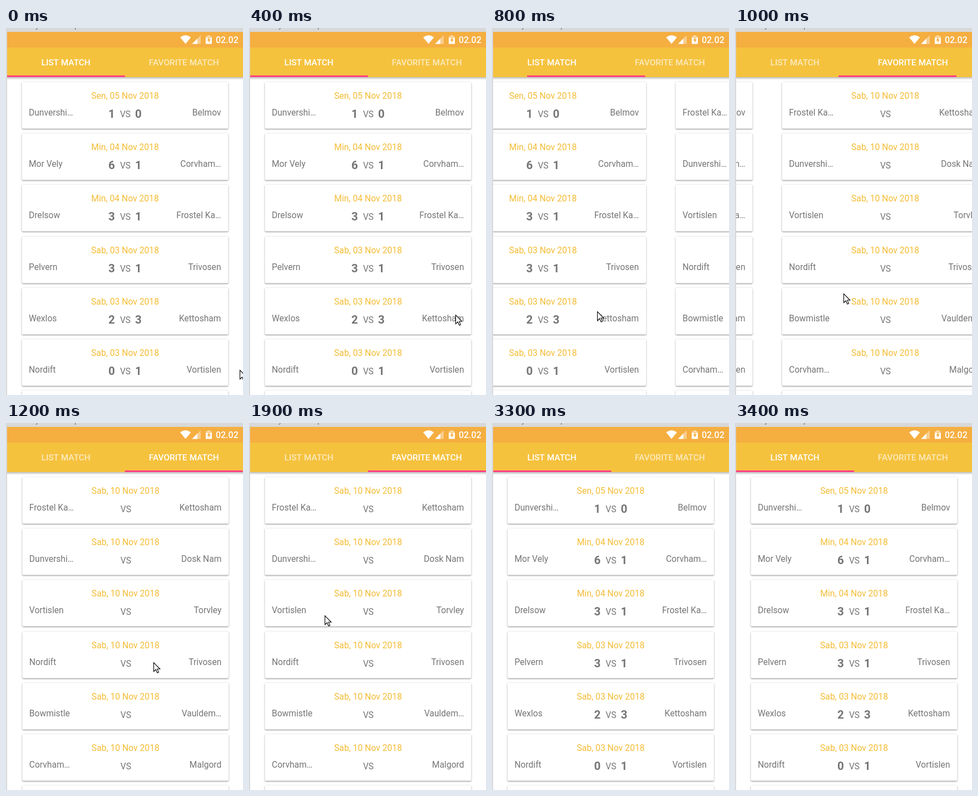
These frames come from a looping animation (426 px wide and 658 px high, 4 s). An HTML page with a canvas:

```html
<!DOCTYPE html>
<html lang="id">
<head>
<meta charset="utf-8">
<title>Match list</title>
<style>
html, body { margin: 0; width: 100%; height: 100%; overflow: hidden; background: #fff; }
canvas { display: block; }
</style>
</head>
<body>
<canvas width="426" height="658"></canvas>
<script>
const W = 426, H = 658, LEFT = 2, PAGE = 424, PITCH = 92.2;
const LOOP = 4000, STEP = 100;
const ctx = document.querySelector('canvas').getContext('2d');

// date | home | away | score
const played = [
  'Sen, 05 Nov 2018|Dunvershi…|Belmov|10',
  'Min, 04 Nov 2018|Mor Vely|Corvham…|61',
  'Min, 04 Nov 2018|Drelsow|Frostel Ka…|31',
  'Sab, 03 Nov 2018|Pelvern|Trivosen|31',
  'Sab, 03 Nov 2018|Wexlos|Kettosham|23',
  'Sab, 03 Nov 2018|Nordift|Vortislen|01'
];
const upcoming = [
  'Frostel Ka…|Kettosham', 'Dunvershi…|Dosk Nam', 'Vortislen|Torvley',
  'Nordift|Trivosen', 'Bowmistle|Vauldem…', 'Corvham…|Malgord'
].map(teams => 'Sab, 10 Nov 2018|' + teams);

// [time, value...] keys
const scrollKeys = [
  [600, 0], [700, 28], [800, 122.5], [900, 265], [1000, 368], [1100, 413],
  [1200, 423.2], [1300, 424], [2300, 424], [2400, 412.5], [3200, 412.5],
  [3300, 0.6], [3400, 0]
];
const cursorKeys = [
  [0, 420, 613], [400, 371, 514], [600, 330, 510], [800, 189, 508],
  [900, 160, 500], [1200, 265, 429], [1800, 131, 362], [1900, 136, 345],
  [2100, 149, 323], [2200, 149, 323], [2400, 245, 310]
];

function at(keys, t) {
  const i = keys.findIndex(k => k[0] > t);
  if (i === 0) return keys[0].slice(1);
  if (i < 0) return keys[keys.length - 1].slice(1);
  const a = keys[i - 1], b = keys[i], p = (t - a[0]) / (b[0] - a[0]);
  return a.slice(1).map((v, n) => v + (b[n + 1] - v) * p);
}

function rect(x, y, w, h, color) {
  ctx.fillStyle = color;
  ctx.fillRect(x, y, w, h);
}

function shape(path, color) {
  ctx.fillStyle = color;
  ctx.fill(new Path2D(path));
}

function text(str, x, y, size, color, align = 'center', weight = 400) {
  ctx.font = `${weight} ${size}px Roboto, sans-serif`;
  ctx.textAlign = align;
  ctx.fillStyle = color;
  ctx.fillText(str, x, y);
}

function card(x, y, row) {
  ctx.save();
  ctx.shadowColor = 'rgba(0,0,0,.42)';
  ctx.shadowBlur = 2.5;
  ctx.shadowOffsetY = 1.3;
  ctx.fillStyle = '#fff';
  ctx.beginPath();
  ctx.roundRect(x + 28.5, y + .5, 371, 84, 2);
  ctx.fill();
  ctx.restore();
  rect(x + 30, y, 368, 1, '#eee');
  if (!row) return;
  const [date, home, away, score] = row.split('|'), grey = '#757575';
  text(date, x + 214, y + 30.5, 15.7, '#f4bc35');
  text(home, x + 41, y + 60.5, 15.6, grey, 'left');
  text(away, x + 386.5, y + 60.5, 15.6, grey, 'right');
  text('VS', x + 214.5, y + 63.5, 15.6, grey);
  if (score) {
    text(score[0], x + 190, y + 65, 20.5, grey, 'center', 700);
    text(score[1], x + 238, y + 65, 20.5, grey, 'center', 700);
  }
}

function page(rows, x) {
  if (x <= -PAGE || x >= PAGE) return;
  for (let i = 0; i < 7; i++) card(x, 96 + Math.round(i * PITCH), rows[i]);
}

function header(scroll, second) {
  const shade = ctx.createLinearGradient(0, 88, 0, 93);
  shade.addColorStop(0, 'rgba(0,0,0,.26)');
  shade.addColorStop(1, 'rgba(0,0,0,0)');
  rect(0, 88, W, 5, shade);
  rect(0, 35, W, 53, '#f5c23e');
  rect(0, 7, W, 28, '#f5ae40');

  const on = '#fff', off = 'rgba(255,255,255,.66)';
  text('LIST MATCH', 107.7, 67.3, 15.4, second ? off : on, 'center', 500);
  text('FAVORITE MATCH', 319.8, 67.3, 15.4, second ? on : off, 'center', 500);
  rect(LEFT + scroll / 2, 85, PAGE / 2, 3, '#ff4081');

  shape('M322.7 28.5 L313 16.7 Q322.7 9.3 332.4 16.7Z', '#fff');
  shape('M350 13V28.5H334.5Z', 'rgba(255,255,255,.4)');
  shape('M344 19V28.5H334.5Z', '#fff');
  shape('M362 13H367V15H370V20H359V15H362Z', 'rgba(255,255,255,.5)');
  shape('M359 18H370V28.5H359Z', '#fff');
  shape('M365.5 16L361.5 22.5H364V26.5L368 20.5H365.5Z', '#f5ae40');
  text('02.02', 397.3, 27, 16, '#fff', 'center', 500);
}

function cursor([x, y]) {
  ctx.save();
  ctx.translate(Math.round(x) + .5, Math.round(y) + .5);
  const arrow = 'M0 0V16L3.8 12.5L6.5 18.5L9 17.4L6.4 11.5H11.3Z';
  shape(arrow, '#fff');
  ctx.strokeStyle = '#000';
  ctx.lineWidth = 1.1;
  ctx.stroke(new Path2D(arrow));
  ctx.restore();
}

function draw(t) {
  const [scroll] = at(scrollKeys, t);
  rect(0, 0, W, H, '#fff');
  ctx.save();
  ctx.beginPath();
  ctx.rect(LEFT, 0, PAGE, H);
  ctx.clip();
  page(played, -scroll);
  page(upcoming, PAGE - scroll);
  header(scroll, t >= 900 && t < 3300);
  ctx.restore();

  // window frame with the cut-off title above it
  rect(0, 0, W, 7, '#d8d8d8');
  rect(0, 0, LEFT, H, '#d8d8d8');
  text('y', 53, -.5, 14, '#777', 'left');
  text('p', 123, -.5, 14, '#777', 'left');

  if (t < 3300) cursor(at(cursorKeys, t));
}

const start = performance.now();
function tick() {
  const t = (performance.now() - start) % LOOP;
  draw(Math.floor(t / STEP) * STEP);
  requestAnimationFrame(tick);
}
tick();
</script>
</body>
</html>
```
